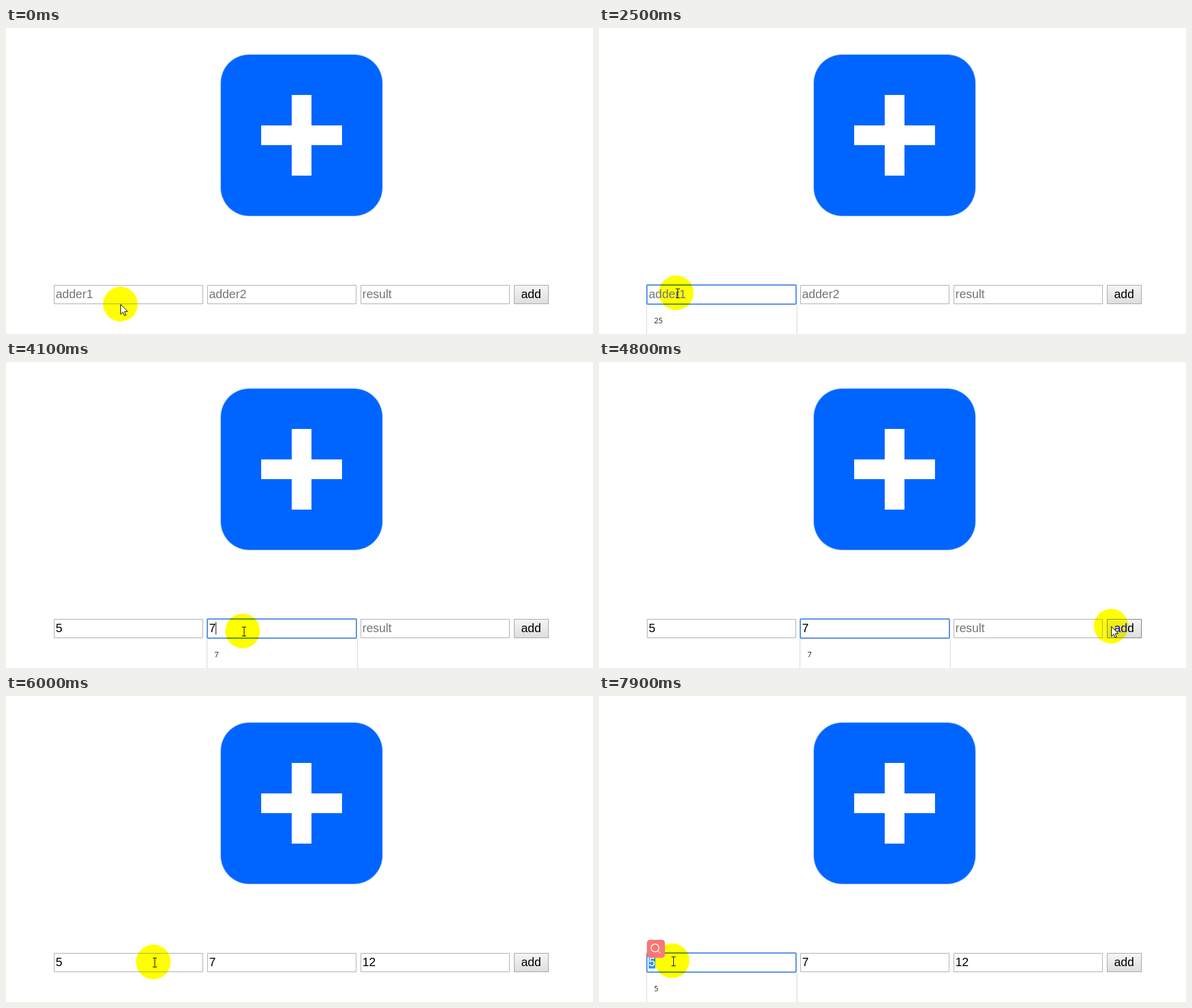
Animation, 980 px wide and 512 px high, one loop 8000 ms. Source, as an HTML page with a canvas:

```html
<!DOCTYPE html>
<html lang="en">
<head>
<meta charset="utf-8">
<title>Adder form</title>
<style>
  html, body { margin: 0; width: 100%; height: 100%; overflow: hidden; background: #fff; }
  canvas { display: block; }
</style>
</head>
<body>
<canvas id="stage" width="980" height="512"></canvas>
<script>
const ctx = document.getElementById('stage').getContext('2d');
const LOOP = 8000, STEP = 100, BLINK = 530;
const FORM_FONT = '20px "Liberation Sans", Arial, sans-serif';
const MENU_FONT = '12.5px "Open Sans", sans-serif';
const fieldX = i => 80 + 256 * i;

// What the user does, in ms
const CLICK_FIRST = 870, TYPE_FIRST = 2700, CLICK_SECOND = 3270, TYPE_SECOND = 4000;
const PRESS_ADD = 4900, RELEASE_ADD = 5000, DRAG = 6300, SELECT = 6500;
const SHOW_ICON = 6900, FADE_ICON = 7900;

const clamp01 = v => Math.max(0, Math.min(1, v));
const ease = u => u * u * (3 - 2 * u);

function mouseAt(t) {
  let x = 191, y = 462;
  const glide = (from, duration, toX, toY) => {
    const k = ease(clamp01((t - from) / duration));
    x += (toX - x) * k;
    y += (toY - y) * k;
  };
  glide(0, 800, 129, 443);
  glide(2700, 550, 395, 450);
  glide(4100, 600, 855, 442);
  glide(5560, 600, 116, 446);
  glide(DRAG, 300, 80, 450);
  glide(6800, 300, 85, 451);
  glide(7100, 500, 122, 443);
  return [Math.round(x), Math.round(y)];
}

function rect(x, y, w, h, color) {
  ctx.fillStyle = color;
  ctx.fillRect(x, y, w, h);
}

function rounded(x, y, w, h, r, color) {
  ctx.fillStyle = color;
  ctx.beginPath();
  ctx.roundRect(x, y, w, h, r);
  ctx.fill();
}

function text(str, x, y, color, font = FORM_FONT) {
  ctx.font = font;
  ctx.fillStyle = color;
  ctx.fillText(str, x, y);
}

function plusTile() {
  rounded(358, 44, 271, 271, 48, '#80b2ff');
  rounded(359, 45, 269, 269, 47, '#0065ff');
  rect(477, 112, 33, 135, '#fff');
  rect(426, 163, 135, 33, '#fff');
}

function field(x, value, hint, focused) {
  ctx.strokeStyle = focused ? '#4d8be0' : '#a9a9a9';
  ctx.lineWidth = focused ? 2 : 1;
  ctx.beginPath();
  if (focused) ctx.roundRect(x, 430, 249, 32, 1);
  else ctx.rect(x + .5, 430.5, 248, 31);
  ctx.stroke();
  text(value || hint, x + 3, 452, value ? '#000' : '#757575');
}

function menu(x, item, age) {
  ctx.globalAlpha = clamp01(.4 + age / 300);
  rect(x - 1, 463, 252, 49, '#fff');
  rect(x - 1, 463, 1, 49, '#d4d4d4');
  rect(x + 250, 463, 1, 49, '#d4d4d4');
  text(item, x + 12, 494, '#222', MENU_FONT);
  ctx.globalAlpha = 1;
}

function caret(x, value, age) {
  ctx.font = FORM_FONT;
  const end = Math.round(x + 3 + ctx.measureText(value).width);
  if (Math.floor(age / BLINK) % 2 === 0) rect(end, 435, 1, 21, '#000');
}

function button(hover, pressed) {
  const shade = ctx.createLinearGradient(0, 430, 0, 462);
  shade.addColorStop(pressed ? 1 : 0, '#f6f6f6');
  shade.addColorStop(pressed ? 0 : 1, '#ddd');
  rect(848, 430, 58, 32, shade);
  ctx.strokeStyle = hover ? '#777' : '#a0a0a0';
  ctx.lineWidth = 1;
  ctx.strokeRect(848.5, 430.5, 57, 31);
  text('add', 860, 452, '#000');
}

function searchIcon(color) {
  rounded(80, 408, 30, 30, 5, color);
  ctx.strokeStyle = '#fff';
  ctx.lineWidth = 1.6;
  ctx.beginPath();
  ctx.arc(93.5, 421.5, 6.5, 0, Math.PI * 2);
  ctx.moveTo(98.5, 426.5);
  ctx.lineTo(103, 431);
  ctx.stroke();
}

// The halo inverts the blue channel, so white turns yellow
function halo(x, y) {
  ctx.globalCompositeOperation = 'difference';
  ctx.fillStyle = '#00f';
  ctx.beginPath();
  ctx.arc(x, y, 29, 0, Math.PI * 2);
  ctx.fill();
  ctx.globalCompositeOperation = 'source-over';
}

function cursor(x, y, overField) {
  ctx.save();
  ctx.translate(x, y);
  if (overField) {
    rect(2, -7, 1, 16, '#000');
    for (const dy of [-7, 8]) {
      rect(-1, dy, 3, 1, '#000');
      rect(3, dy, 3, 1, '#000');
    }
  } else {
    const arrow = new Path2D('M.5 .5V17L4.3 13.3 6.8 19.2 9.3 18.1 6.8 12.3H12Z');
    ctx.fillStyle = '#fff';
    ctx.fill(arrow);
    ctx.strokeStyle = '#000';
    ctx.lineWidth = 1;
    ctx.stroke(arrow);
  }
  ctx.restore();
}

function draw(t) {
  const [mx, my] = mouseAt(t);
  const inRow = my >= 430 && my < 462 && t > 0;
  const overField = inRow && [0, 1, 2].some(i => mx >= fieldX(i) && mx < fieldX(i) + 249);
  const between = (from, to) => t >= from && t < to;

  const values = [
    t >= TYPE_FIRST ? '5' : '',
    t >= TYPE_SECOND ? '7' : '',
    t >= RELEASE_ADD ? '12' : ''
  ];
  const focus = between(CLICK_FIRST, CLICK_SECOND) || t >= DRAG ? 0
              : between(CLICK_SECOND, RELEASE_ADD) ? 1 : -1;
  const selected = t >= SELECT;

  rect(0, 0, 980, 512, '#fff');
  plusTile();
  ['adder1', 'adder2', 'result'].forEach((hint, i) =>
    field(fieldX(i), values[i], hint, i === focus));
  button(inRow && mx >= 848, between(PRESS_ADD, RELEASE_ADD));

  if (between(CLICK_FIRST, TYPE_FIRST)) menu(fieldX(0), '25', t - CLICK_FIRST);
  if (focus === 1) menu(fieldX(1), '7', t - CLICK_SECOND);
  if (t >= DRAG) menu(fieldX(0), '5', t - DRAG);

  if (selected) {
    rect(83, 434, 11, 22, '#3390ff');
    text('5', 83, 452, '#fff');
  } else if (focus >= 0) {
    const lastInput = Math.max(...[CLICK_FIRST, TYPE_FIRST, CLICK_SECOND, TYPE_SECOND, DRAG]
      .filter(time => time <= t));
    caret(fieldX(focus), values[focus], t - lastInput);
  }

  if (t >= SHOW_ICON) searchIcon(t >= FADE_ICON ? '#f97573' : '#ff4747');
  halo(mx, my);
  cursor(mx, my, overField);
}

function tick() {
  draw(Math.floor(performance.now() % LOOP / STEP) * STEP);
  requestAnimationFrame(tick);
}
tick();
</script>
</body>
</html>
```
